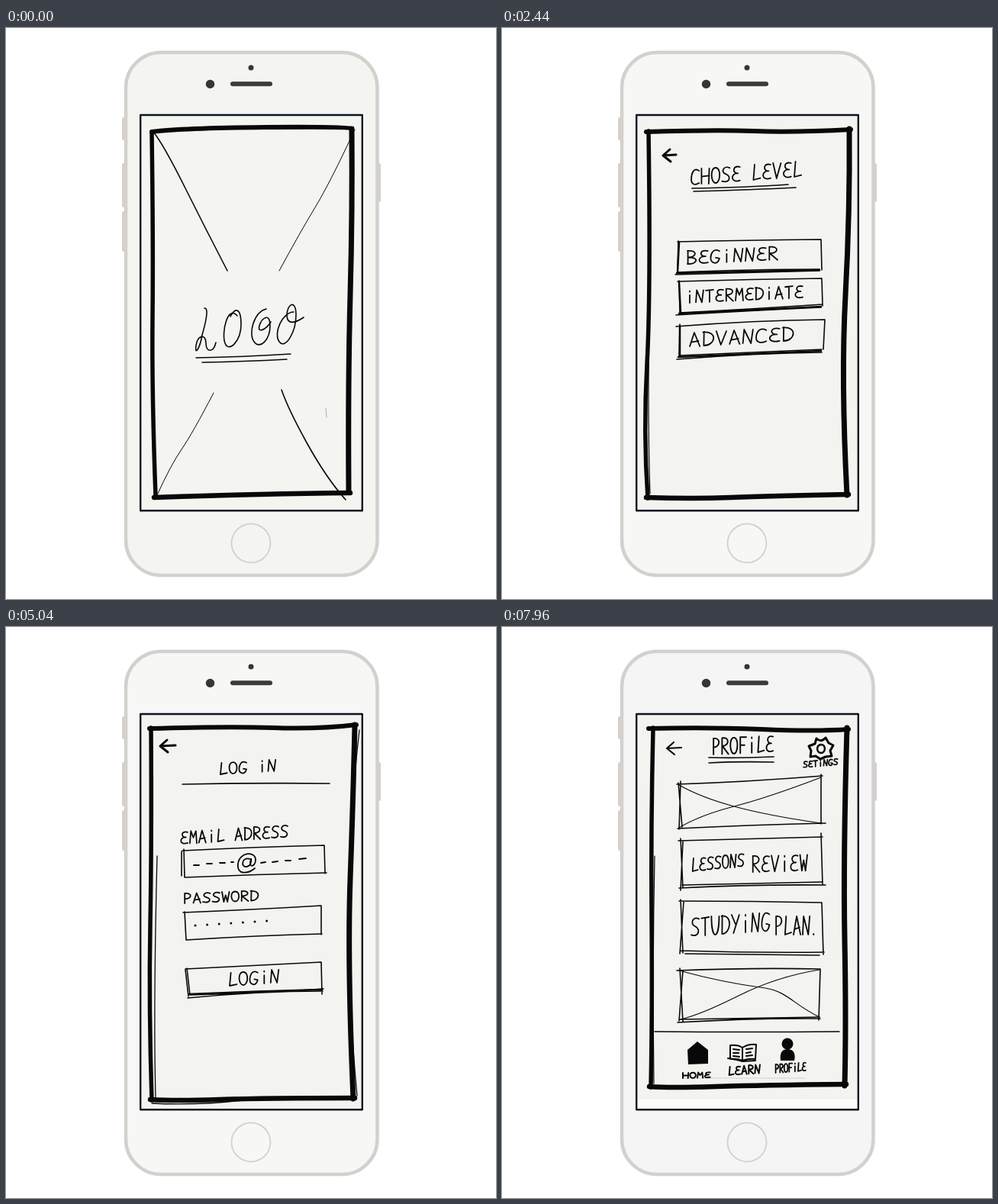
Write an HTML page with a canvas that moves like this. It is 642 by 748 pixels and loops after 8 s.

```html
<!DOCTYPE html>
<html lang="en">
<head>
<meta charset="utf-8">
<title>Sketched language app</title>
<style>
html, body { margin: 0; width: 100%; height: 100%; overflow: hidden; background: #fff; }
canvas { display: block; }
</style>
</head>
<body>
<canvas width="642" height="748" role="img" aria-label="Hand-drawn app screens on a phone"></canvas>
<script>
const canvas = document.querySelector('canvas');
const ctx = canvas.getContext('2d');
const RED = '#d9485f', BLACK = '#080808', CASE = '#d4d0cd';

// Pen strokes of each letter in a cell 4 wide and 6 tall.
const LETTERS = {
  A: 'M0 6L1.8 0 4 6M.6 4.2L3.5 3.6',
  B: 'M.2 0V6M0 0C5 -.5 4 3 .5 3C6 3 4 6.5 0 6',
  C: 'M4 .6C1 -1 0 2 0 4S2 6.5 4 5.4',
  D: 'M.4 0L.3 6M0 .2C6 -.5 5 6 .3 6',
  E: 'M4 .3C0 -.6 0 3 3 2.8C-1 2.5 -1 7 4 5.6',
  F: 'M.5 6V0L4 0M.5 3H3',
  G: 'M4 .6C1 -1 0 2 0 4S3 7.5 4 4L2.3 3.7',
  H: 'M0 0V6M4 0L3.7 6M0 3.2L4 2.8',
  I: 'M2 0V6M1 .2L3.4 0M.6 6H3',
  K: 'M.5 0V6M4 .5L.5 3 4 6',
  L: 'M1 0L.4 6 4 5.3',
  M: 'M0 6L.6 0 2 3.2 3.5 0 4 6',
  N: 'M0 6L.5 0 3.2 6 4 0',
  O: 'M2 0C-1 0 -.5 6 2 6S5 0 2 0',
  P: 'M.5 6V0C5 -.5 4.5 3.4 .5 3.3',
  R: 'M.3 6V0C5 -.5 4.5 3 .5 3L4 6',
  S: 'M4 .4C1 -.8 -1 2 2 2.8S4 6.5 0 5.6',
  T: 'M0 .4L4 0M2 .2V6',
  U: 'M0 0C0 8 4 8 4 0',
  V: 'M0 0L1.8 6 4 0',
  W: 'M0 0L1 6 2 2 3 6 4 0',
  Y: 'M0 0L2 3M4 0L1 6',
  i: 'M2 2.2V6M2 .2V.6',
  'Ê': 'M4 .3C0 -.6 0 3 3 2.8C-1 2.5 -1 7 4 5.6M.5 -1L2 -2.4 3.6 -1',
  '?': 'M.5 1C1 -1 4 0 3 2L2 4M2 5.7V6',
  ',': 'M1.5 5L1 7',
  '.': 'M1 5.7V6',
  1: 'M.5 1.5L2.2 0V6M0 6H4',
  2: 'M0 1.2C1 -1 4 0 3.5 2L0 6H4'
};

function ink(width, path, color = BLACK) {
  ctx.lineWidth = width;
  ctx.strokeStyle = color;
  ctx.stroke(new Path2D(path));
}

// x and y give the left end of the baseline; rise lifts the far end.
function write(text, x, y, height, step, rise = 0, pen = 1.6, color = BLACK) {
  const line = new Path2D();
  [...text].forEach((char, i) => {
    if (char === ' ') return;
    const top = y - height - rise * i / text.length;
    line.addPath(new Path2D(LETTERS[char]),
      new DOMMatrix([step * .19, 0, 0, height / 6, x + i * step, top]));
  });
  ctx.lineWidth = pen;
  ctx.strokeStyle = color;
  ctx.stroke(line);
}

function dot(x, y, r, color = BLACK) {
  ctx.fillStyle = color;
  ctx.beginPath();
  ctx.arc(x, y, r, 0, 7);
  ctx.fill();
}

function fill(path, color = BLACK) {
  ctx.fillStyle = color;
  ctx.fill(new Path2D(path));
}

function arrow(x, y, length, pen = 3) {
  ink(pen, `M${x + length} ${y - 1}L${x} ${y}M${x + 9} ${y - 8}L${x} ${y} ${x + 10} ${y + 8}`);
}

function hatch(x, y, w, h, gap = 4) {
  for (let i = 0; i < w; i += gap) ink(1.8, `M${x + i} ${y + h}L${x + i + 4} ${y}`);
}

function border(top, right, bottom, left) {
  ink(6, top);
  ink(7, right);
  ink(6.5, bottom);
  ink(5.5, left);
}

function navigation(home, learn, profile) {
  const at = ([x, y], draw) => {
    ctx.save();
    ctx.translate(x, y);
    draw();
    ctx.restore();
  };
  at(home, () => {
    fill('M-14 -4L-1 -15 13 -4V14L-13 15Z');
    write('HOME', -20, 33, 7, 9.5, 1, 2);
  });
  at(learn, () => {
    ink(2, 'M-16 -9Q-6 -10 0 -6Q8 -11 18 -10L17 9Q8 8 0 11Q-7 8 -16 9ZM0 -6V11M-19 8Q-6 10 0 12L17 11');
    ink(2, 'M-12 -4L-4 -3M-12 1L-5 1M-12 5L-4 6M5 -4L13 -5M5 1L11 0M5 5L13 4');
    write('LEARN', -18, 30, 11, 8.6, 3, 2);
  });
  at(profile, () => {
    dot(0, -11, 7.5);
    fill('M-9 11C-11 -3 -3 -4 0 -4S12 -3 9 11Z');
    write('PROFiLE', -16, 27, 11, 5.9, 3, 1.8);
  });
}

function logoScreen() {
  border('M191 136Q230 131 340 130T453 132', 'M453 132Q454 240 451 350T449 608',
    'M451 609Q340 610 194 615', 'M196 613Q191 480 192 380T191 137');
  ink(1.6, 'M193 136Q206 152 234 208T290 318M361 474Q370 500 395 545T445 618');
  ink(1, 'M457 133Q425 202 405 235T358 318M272 478Q245 530 230 552T198 612');
  ink(1.6, 'M260 367C266 366 262 385 257 402C254 420 247 430 249 416S262 400 262 413S272 425 275 412');
  ink(1.6, 'M303 377C290 362 282 400 287 413S308 410 308 388 300 366 294 378');
  ink(1.6, 'M341 368C325 372 317 400 325 411S346 408 346 390 335 380 332 390 340 396 347 385');
  ink(1.6, 'M377 372C362 372 350 400 358 411S380 398 380 376 368 362 368 376 380 386 390 379');
  ink(1.5, 'M249 432Q310 431 373 427M257 438Q310 437 368 434');
  ink(.7, 'M419 498L420 510', '#888');
}

function languageScreen() {
  border('M191 138Q260 132 340 134T451 136', 'M451 134Q452 330 447 430T446 606',
    'M447 607Q350 608 290 611T190 614', 'M190 615Q188 490 187 400T192 137');
  arrow(213, 169, 27);
  write('SELECT THE LANGUAGE', 265, 185, 13, 8.3, 6);
  write('YOU WiSH TO LEARN', 262, 207, 13, 9.2, 6);
  ink(1.4, 'M260 211Q340 212 424 207M262 214Q320 213 395 210');
  const rows = [[261, 24], [296, 24], [333, 22], [371, 21], [408, 23], [446, 23], [481, 21]];
  for (const [y, h] of rows) {
    ink(1.6, `M228 ${y + 1}L261 ${y}L260 ${y + h}L227 ${y + h}ZM229 ${y - 1}V${y + h + 3}`);
  }
  hatch(239, 262, 10, 22, 2.5);
  ink(1.6, 'M239 261V285M251 261V285');
  hatch(229, 297, 14, 21);
  dot(247, 308, 5);
  hatch(228, 334, 30, 5);
  hatch(228, 348, 30, 6);
  ink(1.6, 'M227 340L260 339M227 348L260 347');
  dot(243, 381, 5);
  hatch(229, 410, 8, 20);
  hatch(247, 410, 10, 20, 2.5);
  ink(1.6, 'M238 409V431M248 409V431');
  ink(2.2, 'M229 448L260 468M260 447L228 468');
  hatch(229, 482, 30, 5, 6);
  hatch(229, 497, 30, 5, 5);
  ink(1.8, 'M228 488L266 487M230 498L268 497');
  dot(237, 493, 3.5);
  ink(1.6, 'M277 273Q330 271 404 266M278 310Q320 311 345 306T397 303M274 344Q330 342 386 334');
  ink(1.6, 'M279 382Q330 380 377 374M273 419Q330 416 391 411M272 457Q330 450 400 443M274 490Q330 486 392 481');
}

function levelScreen() {
  border('M189 136Q280 133 330 135T457 133', 'M455 132Q456 240 450 350T452 612',
    'M454 611Q350 613 300 615T189 615', 'M191 616Q185 530 190 440T192 135');
  ink(1.2, 'M194 300Q190 500 194 610');
  arrow(211, 167, 17);
  write('CHOSE LEVEL', 248, 205, 20, 13.4, 11, 1.8);
  ink(1.7, 'M249 210Q320 209 375 205M251 214Q330 212 385 209');
  ink(1.6, 'M230 280Q320 278 418 277L419 317M231 279L230 320Q330 316 416 316M227 323Q330 320 416 318');
  ink(1.6, 'M230 332Q330 329 419 328L420 364M232 331L233 373Q330 368 420 362M228 376Q330 370 418 366');
  ink(1.6, 'M228 391Q330 383 423 382L421 421M233 388L232 429Q330 425 419 421M229 434Q330 426 419 425');
  ink(2.5, 'M232 281L230 320M232 333L234 373M233 391V430M229 321L416 317M232 374L418 365M231 431L418 423');
  write('BEGiNNER', 243, 309, 17, 15.2, 6, 1.8);
  write('iNTERMEDiATE', 241, 360, 16, 13, 7, 1.8);
  write('ADVANCED', 246, 417, 18, 17.4, 8, 1.8);
}

function lessonScreen() {
  fill('M176 627H467V632H176Z', '#fdfdfd');
  border('M188 127Q280 125 350 128T462 126', 'M459 125Q453 220 451 350T453 608',
    'M455 606Q340 607 280 610T189 611', 'M191 611Q194 500 191 340T192 127');
  ink(1.4, 'M198 330Q194 480 197 608M447 330Q443 490 447 604');
  arrow(205, 157, 20);
  ink(1.7, 'M289 168C291 176 284 184 280 194S272 198 276 193 282 200 293 194');
  write('ESSON', 299, 194, 25, 17.3, 6, 1.7);
  ink(1.6, 'M273 206Q320 202 379 195M275 209Q320 206 368 201');
  write('SiM, EU FALO PORTUGUÊS', 236, 250, 12, 7.7, 8, 1.4, RED);
  ink(1.5, 'M237 223L230 233M242 224L234 235M406 222L408 229M411 220L413 226M306 267L318 266', RED);
  write('WHiCH iS THE CORRECT', 231, 307, 16, 9.8, 8, 1.9);
  write('TRANSLATiON ?', 230, 329, 15, 12.6, 4, 1.9);
  ink(1.6, 'M229 387Q330 384 427 382L424 444M232 385L235 444Q330 443 424 443M231 452V447Q330 448 423 445M235 389L232 442');
  write('1', 248, 425, 23, 25, 0, 2.6);
  write('YES, I SPEAK', 281, 408, 12, 8.9, 5, 1.8);
  write('PORTUGUESE', 284, 430, 11, 9, 3, 1.8);
  ink(1.6, 'M233 472Q330 467 424 468L421 537M237 471L236 540Q330 536 423 535M233 545Q330 540 421 538M240 472L234 543');
  write('2', 248, 514, 23, 19, 0, 2.6);
  write('YES, I LiKE', 278, 492, 12, 9.5, 4, 1.8);
  write('PORTUGUESE FOOD', 276, 514, 11, 8.3, 5, 1.8);
}

function loginScreen() {
  border('M188 133Q290 130 350 132T459 128', 'M457 128Q455 220 451 330T455 618',
    'M457 617Q340 617 280 619T189 619', 'M191 620Q187 500 189 390T190 132');
  ink(1.3, 'M198 300Q193 500 196 616M463 135Q450 250 450 330M450 480Q455 560 460 614M191 624Q250 627 310 620');
  arrow(202, 156, 20);
  write('LOG iN', 280, 193, 15, 12.7, 5, 1.8);
  ink(1.6, 'M231 206Q330 204 424 205');
  write('EMAiL ADRESS', 229, 284, 16, 11.9, 9, 1.8);
  ink(1.6, 'M231 293Q330 288 417 286L418 323M233 291L234 328Q330 324 420 322M230 294L230 326');
  ink(1.8, 'M246 312H253M263 310H270M280 309H287M295 308H298M334 309L340 308M349 308L356 307M366 306L373 306M384 304L393 303');
  ink(1.8, 'M320 304C309 300 307 315 315 314S321 302 321 304C317 316 326 315 327 306C328 293 306 294 304 310S318 323 326 316');
  write('PASSWORD', 233, 362, 13, 12.5, 4, 1.8);
  ink(1.6, 'M232 374Q330 370 413 365L413 403M234 373L236 410Q330 404 414 402');
  for (let i = 0; i < 7; i++) dot(248 + i * 15.6, 391 - i, 1.5);
  ink(1.6, 'M235 448Q330 443 413 439L414 481M237 447L241 482Q330 480 416 474M238 486Q330 477 415 477M235 449L239 484');
  ink(2.4, 'M240 481Q330 477 414 475');
  write('LOGiN', 292, 470, 17, 13.7, 5, 1.8);
}

function homeScreen() {
  border('M192 137Q250 132 330 134T455 138', 'M453 136Q450 270 449 380T446 607',
    'M449 607Q340 608 280 610T190 611', 'M193 611Q190 500 193 380T195 137');
  ink(1.2, 'M375 136Q430 134 455 137');
  write('DAYLY LESSON', 230, 188, 20, 14.3, 9, 1.8);
  ink(1.5, 'M230 193Q310 193 391 187');
  ink(1.5, 'M229 211Q330 209 417 207L414 349M231 209L232 353Q330 351 415 352M229 352L240 350');
  ink(1.2, 'M230 211Q270 243 320 277T414 347M417 208Q370 249 325 278T234 352');
  ink(1.4, 'M231 364Q310 362 395 364M233 364L231 384M236 374H343M236 383Q320 386 385 386');
  ink(.7, 'M230 388V395', '#777');
  write('EVERYDAY VOCAB', 232, 438, 18, 12.5, 9, 1.8);
  ink(1.5, 'M233 443Q320 443 405 437M229 464Q320 462 415 464M232 464L233 541M415 464L413 541');
  ink(1.4, 'M232 464Q280 513 315 542M318 542Q370 500 414 466');
  ink(1.4, 'M195 543Q310 541 444 545');
  navigation([256, 570], [317, 569], [381, 568]);
}

function profileScreen() {
  fill('M176 619H467V632H176Z', '#fbfbfb');
  border('M192 133Q270 131 340 134T454 134', 'M452 132Q447 300 449 410T449 601',
    'M451 599Q340 600 280 602T193 602', 'M195 603Q197 500 196 380T198 132');
  ink(1.2, 'M200 300Q197 450 199 598');
  arrow(216, 159, 19, 2.2);
  write('PROFiLE', 276, 167, 21, 11.7, 4, 1.9);
  ink(1.7, 'M271 171Q310 172 356 170M271 178Q310 176 356 177');
  ink(3, 'M412 146Q418 152 424 145L428 152 434 155 430 162 432 169 424 170 417 173 411 169 404 170 405 162 402 156 410 153Z');
  ink(2.5, 'M418 154C411 155 412 165 418 165S425 154 418 154');
  write('SETiNGS', 395, 184, 8, 6.6, 4, 1.7);
  ink(1.6, 'M229 206Q320 203 420 195M418 193V258M230 264Q330 259 424 257M234 202L232 265M231 204L236 262');
  ink(1.1, 'M232 207Q260 223 304 235T418 257M418 197Q350 223 304 235T232 263');
  ink(1.6, 'M231 280Q330 277 420 275M418 270L420 338M232 342Q330 337 424 338M234 277L237 342M237 281L234 345M236 338Q330 336 419 334');
  write('LESSONS', 249, 320, 17, 10, 7, 1.8);
  write('REViEW', 328, 321, 21, 12.5, 2, 1.8);
  ink(1.6, 'M232 359Q330 359 419 361L421 429M234 357L237 427M238 360L233 428M234 424Q330 427 422 426M240 428Q330 429 416 430');
  write('STUDYiNG', 248, 405, 24, 13.2, 8, 1.8);
  write('PLAN.', 358, 403, 24, 12, 0, 1.8);
  ink(1.6, 'M229 450Q330 446 417 448L415 515M233 447L237 517M237 450L232 516M230 518Q330 512 417 513M232 514L416 511');
  ink(1.2, 'M232 450Q290 466 345 473C375 478 382 495 416 511M416 449Q360 458 310 483T234 514');
  ink(1.3, 'M200 530Q320 531 442 530');
  ink(.6, 'M236 591H397', '#bbb');
  navigation([257, 558], [315, 557], [374, 557]);
}

function phone(body, screen) {
  ctx.fillStyle = '#fff';
  ctx.fillRect(0, 0, 642, 748);
  ink(4, 'M154 119V145M154 179V233M154 242V291M489 179V226', CASE);
  const shape = new Path2D();
  shape.roundRect(157, 32, 329.5, 685, 46);
  ctx.fillStyle = body;
  ctx.fill(shape);
  ctx.lineWidth = 4.5;
  ctx.strokeStyle = CASE;
  ctx.stroke(shape);
  ink(6, 'M297 73.3H346', '#3d3a3a');
  dot(267.5, 73.5, 5.7, '#383535');
  dot(321, 52, 3.5, '#383535');
  ink(1.8, 'M346.5 675A25.5 25.5 0 1 1 346.5 674.9Z', CASE);
  fill('M176 114H467V632H176Z', screen);
}

// Each screen holds until the next start time.
const LOOP = 8000;
const SCREENS = [
  { start: 0, draw: logoScreen, body: '#f4f5f1', screen: '#f4f5f1' },
  { start: 1000, draw: languageScreen },
  { start: 2000, draw: levelScreen },
  { start: 3000, draw: lessonScreen },
  { start: 4120, draw: loginScreen },
  { start: 5680, draw: homeScreen },
  { start: 7080, draw: profileScreen, body: '#f5f5f5' }
];

function render(now) {
  const time = now % LOOP;
  const { draw, body = '#f7f7f5', screen = '#f3f3f0' } = SCREENS.findLast(s => s.start <= time);
  ctx.lineCap = ctx.lineJoin = 'round';
  phone(body, screen);
  draw();
  ink(2.4, 'M176.2 114H466.8V632.2H176.2Z', '#0a1420');
}

const began = performance.now();
function tick() {
  render(performance.now() - began);
  requestAnimationFrame(tick);
}
tick();
</script>
</body>
</html>
```
